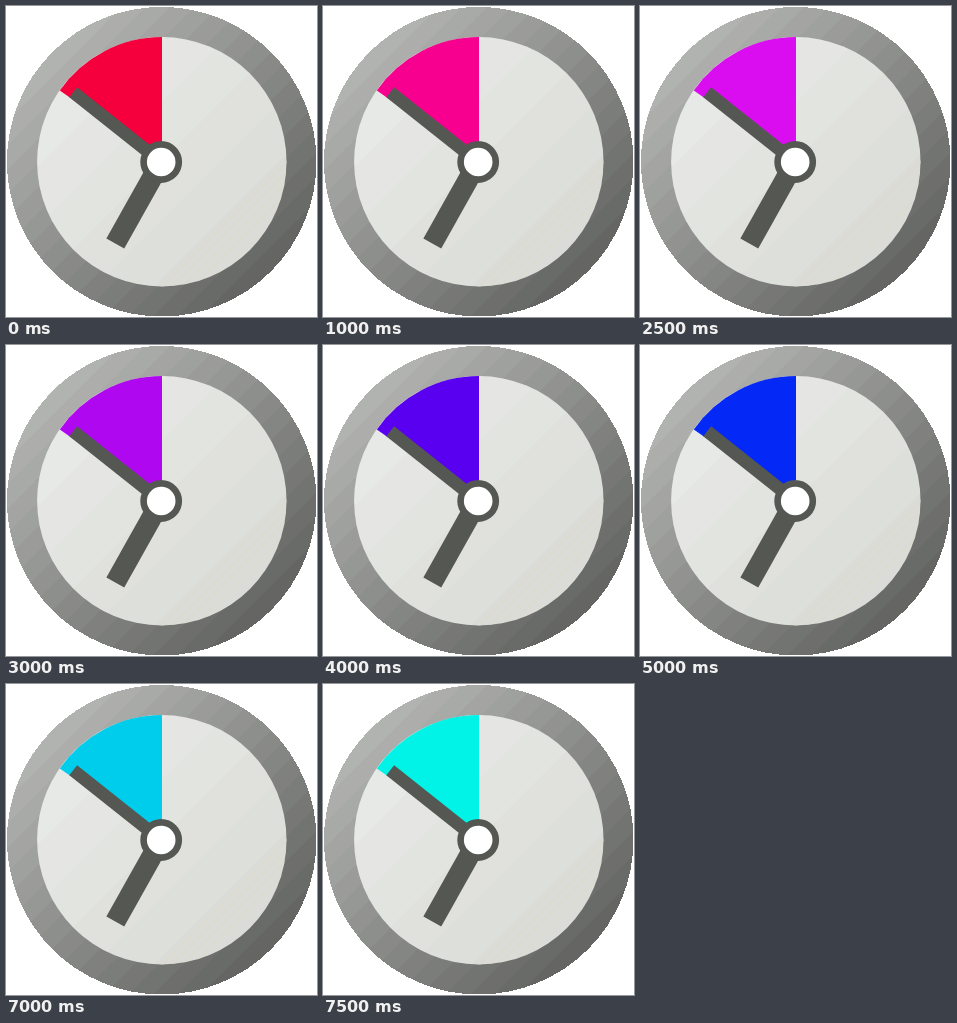
Animation, 311 px wide and 311 px high, one loop 8 s. Source, as an HTML page:

```html
<!DOCTYPE html>
<html lang="en">
<head>
<meta charset="utf-8">
<title>Clock</title>
<style>
  html, body { margin: 0; width: 100%; height: 100%; overflow: hidden; background: #fff; }
  svg { display: block; width: 100vw; height: 100vh; }
</style>
</head>
<body>
<svg viewBox="0 0 311 311">
  <defs>
    <linearGradient id="rim" gradientUnits="userSpaceOnUse" x1="46" y1="46" x2="265" y2="265"></linearGradient>
    <linearGradient id="face" gradientUnits="userSpaceOnUse" x1="67" y1="67" x2="244" y2="244"></linearGradient>
    <clipPath id="dial"><circle cx="155.8" cy="155.8" r="124.7"/></clipPath>
  </defs>
  <circle cx="155.7" cy="155.7" r="154.8" fill="url(#rim)" shape-rendering="crispEdges"/>
  <circle cx="155.8" cy="155.8" r="124.7" fill="url(#face)"/>
  <g id="sheen" clip-path="url(#dial)" stroke="#dbdbce" stroke-width="2.5"></g>
  <path id="wedge" d="M156 156V31.1A124.7 124.7 0 0 0 53.8 84.4Z"/>
  <g stroke="#555753">
    <path d="M155 156L67.2 86.2" stroke-width="12.6"/>
    <path d="M155 156L109.3 237.4" stroke-width="20.5"/>
    <circle cx="155.2" cy="156" r="17.6" fill="#fff" stroke-width="6.6"/>
  </g>
</svg>
<script>
const LOOP = 8000, STEP = 500;
const byId = id => document.getElementById(id);
const mix = (a, b, p) => a + (b - a) * p;

// Fill a gradient with flat diagonal bands between two colours.
function addBands(id, from, to, count) {
  let stops = "";
  for (let i = 0; i < count; i++) {
    const rgb = from.map((c, k) => Math.round(mix(c, to[k], i / (count - 1))));
    for (const edge of [i, i + 1])
      stops += `<stop offset="${edge / count}" stop-color="rgb(${rgb})"/>`;
  }
  byId(id).innerHTML = stops;
}
addBands("rim", [177, 179, 177], [101, 102, 100], 18);
addBands("face", [231, 233, 230], [219, 220, 215], 6);

byId("sheen").innerHTML = [437, 447, 457, 468]
  .map(sum => `<path d="M${sum - 290} 290L290 ${sum - 290}" opacity=".6"/>`).join("");

// Time in ms, then red, green, blue.
const colours = [
  [0, 245, 0, 61], [1000, 247, 0, 143], [2500, 218, 12, 240], [4000, 90, 0, 240],
  [5000, 4, 40, 246], [6000, 0, 128, 246], [7500, 0, 243, 230]
];

function colourAt(time) {
  const next = colours.findIndex(key => key[0] >= time);
  const b = colours[next], a = colours[Math.max(0, next - 1)];
  const p = b === a ? 0 : (time - a[0]) / (b[0] - a[0]);
  return `rgb(${[1, 2, 3].map(k => Math.round(mix(a[k], b[k], p)))})`;
}

function draw(now) {
  const time = Math.floor((now % LOOP) / STEP) * STEP;
  byId("wedge").setAttribute("fill", colourAt(time));
}

const start = performance.now();
function frame() {
  draw(performance.now() - start);
  requestAnimationFrame(frame);
}
frame();
</script>
</body>
</html>
```
